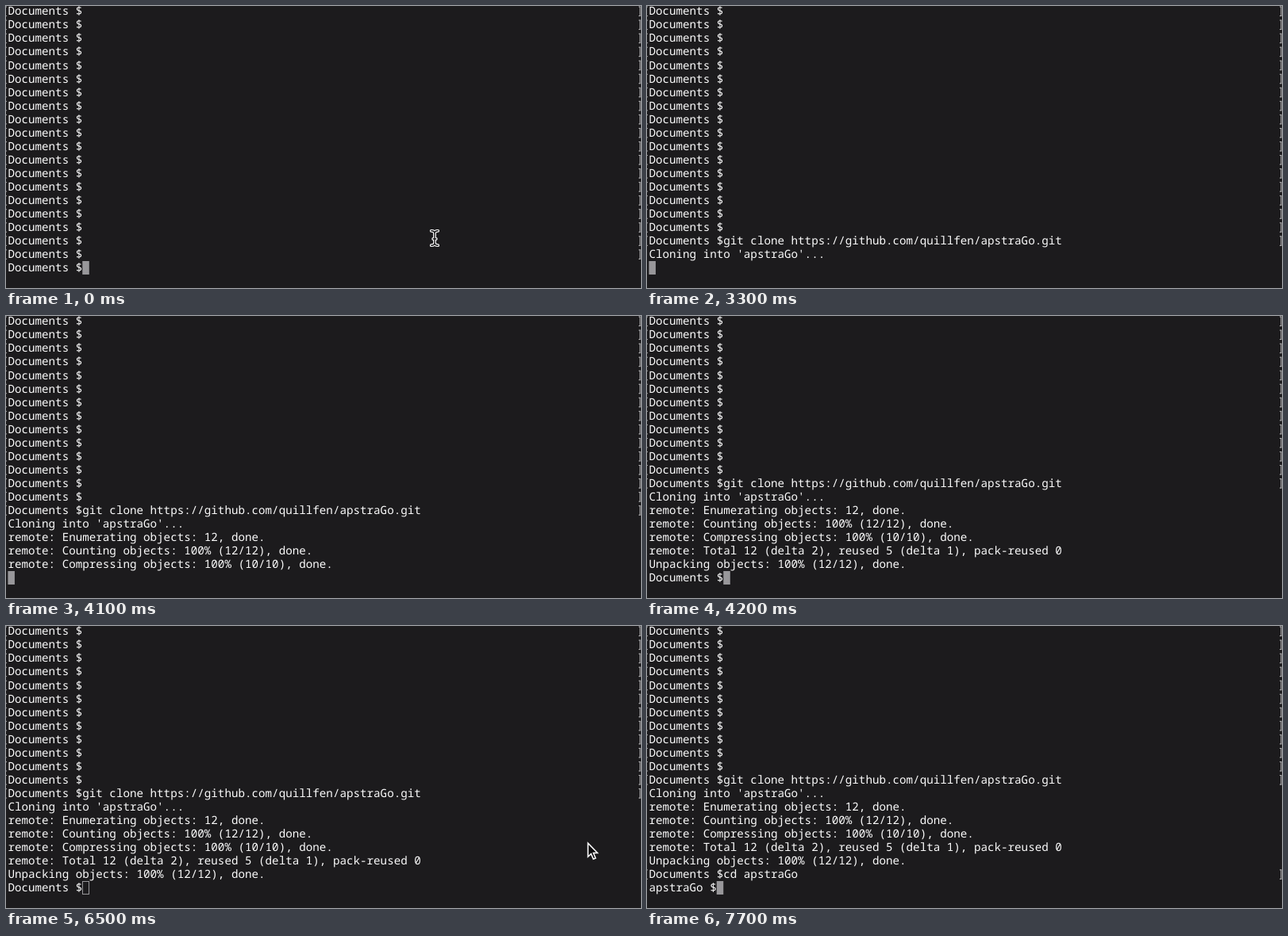
An HTML page with a canvas for the animation above (8 s loop, 800x356 px).

```html
<!DOCTYPE html>
<html lang="en">
<head>
<meta charset="utf-8">
<title>Terminal</title>
<style>
  html, body { margin: 0; width: 100%; height: 100%; overflow: hidden; background: #1c1b1d; }
  canvas { display: block; }
</style>
</head>
<body>
<canvas id="stage" width="800" height="356"></canvas>
<script>
const ctx = document.getElementById('stage').getContext('2d');
const LOOP = 8000, ROWS = 20;
const LEFT = 2.4, COL = 8.532, TOP = -2, ROW = 17.05, BASE = 13.3;
const BG = '#1c1b1d', FG = '#fbfbfb', GREY = '#98979a', MARK = '#b0afb1';

const PROMPT = 'Documents $';
const CLONE = 'git clone https://github.com/quillfen/apstraGo.git';

// Lines appended to the terminal over time
const OUTPUT = [
  [3300, "Cloning into 'apstraGo'..."],
  [4100, 'remote: Enumerating objects: 12, done.'],
  [4100, 'remote: Counting objects: 100% (12/12), done.'],
  [4100, 'remote: Compressing objects: 100% (10/10), done.'],
  [4200, 'remote: Total 12 (delta 2), reused 5 (delta 1), pack-reused 0'],
  [4200, 'Unpacking objects: 100% (12/12), done.']
];

const prompt = (text, marked) => ({ text: PROMPT + text, marked });

function linesAt(t) {
  const lines = Array.from({ length: ROWS - 1 }, () => prompt('', true));
  if (t < 3300) {
    lines.push(prompt(t < 1400 ? '' : CLONE + ' ', false));
    return lines;
  }
  lines.push(prompt(CLONE, true));
  for (const [at, text] of OUTPUT) if (t >= at) lines.push({ text });
  if (t < 4200) lines.push({ text: '' });
  else if (t < 7200) lines.push(prompt('', false));
  else if (t < 7700) lines.push(prompt('cd apstraGo', false));
  else lines.push(prompt('cd apstraGo', true), { text: 'apstraGo $' });
  return lines;
}

// Pointer states: start time, shape, position
const POINTER = [
  [0, 'beam', 540, 293],
  [3300, null],
  [3600, 'arrow', 538.2, 285.2],
  [3800, 'arrow', 727.2, 340],
  [3900, null],
  [6500, 'arrow', 733.2, 274.2],
  [6600, 'arrow', 732.4, 273.6],
  [6800, 'beam', 733, 273],
  [7700, null]
];

function drawMarks(y) {
  ctx.fillStyle = MARK;
  ctx.fillRect(0, y + 2.5, 1, 1);
  ctx.fillRect(0, y + 14, 1, 1);
  ctx.fillRect(797, y + 2.5, 2.4, 1);
  ctx.fillRect(797, y + 14, 2.4, 1);
  ctx.fillRect(798.3, y + 2.5, 1.2, 12.5);
}

function drawCursor(col, focused) {
  const x = LEFT + col * COL, y = Math.round(TOP + (ROWS - 1) * ROW);
  if (focused) {
    ctx.fillStyle = GREY;
    ctx.fillRect(x, y, COL, 17);
  } else {
    ctx.strokeStyle = GREY;
    ctx.lineWidth = 1;
    ctx.strokeRect(Math.round(x) + 0.5, y + 0.5, 8, 16);
  }
}

function drawArrow(x, y) {
  const pts = [[0, 0], [0, 17], [3.9, 13.4], [6.8, 20], [9.6, 18.8], [6.8, 12.3], [12, 12.3]];
  ctx.beginPath();
  for (const [dx, dy] of pts) ctx.lineTo(x + dx, y + dy);
  ctx.closePath();
  ctx.fillStyle = '#0c0b0d';
  ctx.fill();
  ctx.strokeStyle = '#fff';
  ctx.lineWidth = 1.5;
  ctx.stroke();
}

function drawBeam(x, y) {
  ctx.beginPath();
  for (const s of [-1, 1]) {
    ctx.moveTo(x - 4.2, y + s * 9.2);
    ctx.quadraticCurveTo(x, y + s * 9.2, x, y + s * 6);
    ctx.quadraticCurveTo(x, y + s * 9.2, x + 4.2, y + s * 9.2);
  }
  ctx.moveTo(x, y - 7);
  ctx.lineTo(x, y + 7);
  ctx.moveTo(x - 1.8, y + 1);
  ctx.lineTo(x + 1.8, y + 1);
  for (const [color, width] of [['#fff', 3.8], ['#141315', 1.4]]) {
    ctx.strokeStyle = color;
    ctx.lineWidth = width;
    ctx.stroke();
  }
}

function draw(t) {
  ctx.fillStyle = BG;
  ctx.fillRect(0, 0, 800, 356);

  const lines = linesAt(t).slice(-ROWS);
  drawCursor(lines[ROWS - 1].text.length, t < 4400 || t >= 6700);
  lines.forEach(({ text, marked }, row) => {
    const y = TOP + row * ROW;
    if (marked) drawMarks(y);
    ctx.fillStyle = FG;
    ctx.fillText(text, LEFT, y + BASE);
  });

  const [, shape, x, y] = POINTER.filter(p => p[0] <= t).pop();
  if (shape === 'beam') drawBeam(x, y);
  if (shape === 'arrow') drawArrow(x, y);
}

ctx.font = '500 14.22px "Noto Sans Mono", "DejaVu Sans Mono", monospace';
ctx.textRendering = 'geometricPrecision';
ctx.lineCap = 'round';
ctx.lineJoin = 'miter';

const start = performance.now();
function tick() {
  draw((performance.now() - start) % LOOP);
  requestAnimationFrame(tick);
}
tick();
</script>
</body>
</html>
```
